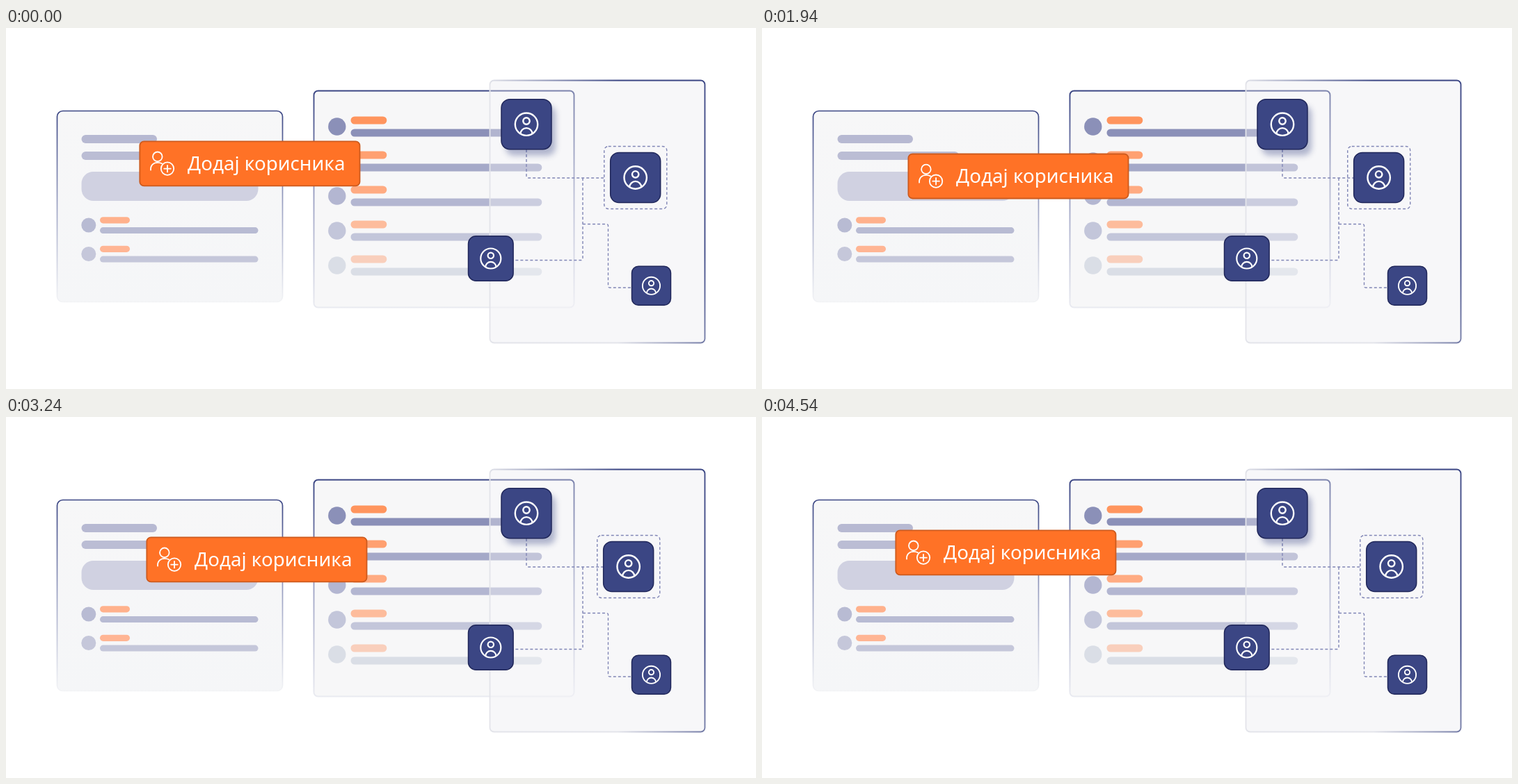
These frames come from a looping animation (1078 by 520 pixels, 4560 ms). An HTML page with a canvas:

```html
<!DOCTYPE html>
<html lang="sr">
<head>
<meta charset="utf-8">
<title>Додај корисника</title>
<style>
  html, body { margin: 0; width: 100%; height: 100%; overflow: hidden; background: #fff; }
  canvas { display: block; width: 1078px; height: 520px; }
</style>
</head>
<body>
<canvas id="stage"></canvas>
<script>
const W = 1078, H = 520;
const HALF = 1140, REST = 800, TICK = 20, STEPS = 17, SHIFT = 18.2;
const NAVY = '#3b4684', PAPER = '#f7f7f8';
const canvas = document.getElementById('stage');
const ctx = canvas.getContext('2d');
const dpr = window.devicePixelRatio || 1;
canvas.width = W * dpr;
canvas.height = H * dpr;

function box(x, y, w, h, r, fill, stroke, line = 1.6) {
  ctx.beginPath();
  ctx.roundRect(x, y, w, h, r);
  if (fill) { ctx.fillStyle = fill; ctx.fill(); }
  if (stroke) { ctx.strokeStyle = stroke; ctx.lineWidth = line; ctx.stroke(); }
}

function disc(x, y, r, fill) {
  ctx.beginPath();
  ctx.arc(x, y, r, 0, Math.PI * 2);
  ctx.fillStyle = fill;
  ctx.fill();
}

function ring(x, y, r) {
  ctx.beginPath();
  ctx.arc(x, y, r, 0, Math.PI * 2);
  ctx.stroke();
}

const bar = (x1, x2, y, h, fill) => box(x1, y - h / 2, x2 - x1, h, h / 2, fill);

function gradient(x1, y1, x2, y2, ...colors) {
  const g = ctx.createLinearGradient(x1, y1, x2, y2);
  colors.forEach((c, i) => g.addColorStop(i / (colors.length - 1), c));
  return g;
}

function dashes(points) {
  ctx.beginPath();
  ctx.moveTo(...points[0]);
  for (let i = 1; i < points.length - 1; i++) ctx.arcTo(...points[i], ...points[i + 1], 2);
  ctx.lineTo(...points[points.length - 1]);
  ctx.stroke();
}

function dashStyle() {
  ctx.setLineDash([4, 3]);
  ctx.strokeStyle = '#8186b6';
  ctx.lineWidth = 1.4;
}

function tile(cx, cy, size) {
  const h = size / 2;
  box(cx - h, cy - h, size, size, size * 0.17, NAVY, '#20275a', 1.5);
  const k = size / 72;
  ctx.save();
  ctx.translate(cx, cy);
  ctx.scale(k, k);
  ctx.strokeStyle = '#fff';
  ctx.lineWidth = 2.4;
  ring(0, 0, 16.2);
  ring(0, -4.7, 4.7);
  ctx.beginPath();
  ctx.ellipse(0, 13.6, 8.4, 8.2, 0, Math.PI, Math.PI * 2);
  ctx.stroke();
  ctx.restore();
}

function leftCard() {
  box(73.5, 119.5, 324, 275, 8, gradient(0, 119, 0, 395, '#f7f7f8', '#f5f6f8'),
    gradient(0, 119, 0, 395, NAVY, '#9ea4c4', '#f3f4f6'), 1.7);
  bar(108.5, 217, 160, 12, '#b7b9d2');
  bar(108.5, 283, 184, 12, '#bbbdd4');
  box(108.5, 207, 254, 42, 17, '#d0d1e1');
  [[284, '#b8bbd3', '#ffb18c'], [325.5, '#c5c7da', '#ffb594']].forEach(([y, blue, orange]) => {
    disc(118.8, y, 10.5, blue);
    bar(135, 178, y - 7.2, 9.2, orange);
    bar(135, 362.5, y + 7.6, 9, blue);
  });
}

function rightCards() {
  box(695.5, 75.5, 309, 378, 6, PAPER);
  box(442.5, 90.5, 374, 312, 6, PAPER, gradient(0, 90, 0, 403, NAVY, '#a0a5c6', '#eaebf1'), 1.9);
  const rows = [
    ['#8b90b8', '#ff955e'], ['#a5a9c8', '#ffa071'], ['#b3b6d1', '#ffab82'],
    ['#c3c6da', '#fdbc9c'], ['#dadee6', '#f9cfbc']
  ];
  rows.forEach(([blue, orange], i) => {
    const y = 142 + i * 50;
    disc(475.8, y, 12.7, blue);
    bar(495.5, 547.3, y - 9, 11, orange);
    bar(495.5, 770.3, y + 9, 11, blue);
  });
  ctx.globalAlpha = 0.35;
  box(695.5, 75.5, 309, 378, 6, PAPER);
  ctx.globalAlpha = 1;
  box(695.5, 75.5, 309, 378, 6, null, gradient(690, 75, 842, -1, '#e3e4ea', NAVY), 1.8);
}

function links() {
  ctx.save();
  dashStyle();
  dashes([[748, 175], [748, 216], [860, 216]]);
  dashes([[829, 216], [829, 334.5], [729, 334.5]]);
  dashes([[829, 282.5], [865.5, 282.5], [865.5, 374], [899, 374]]);
  ctx.restore();
}

function fixedTiles() {
  ctx.save();
  ctx.shadowColor = 'rgba(59,70,132,.38)';
  ctx.shadowBlur = 9 * dpr;
  ctx.shadowOffsetX = 6 * dpr;
  ctx.shadowOffsetY = 9 * dpr;
  box(712, 102.7, 72, 72, 12, NAVY);
  ctx.restore();
  tile(748, 138.7, 72);
  tile(696.8, 332, 64.6);
  tile(927.5, 371.3, 56);
}

function movingTile(dx) {
  ctx.save();
  ctx.translate(dx, 0);
  ctx.save();
  dashStyle();
  ctx.beginPath();
  ctx.roundRect(859.8, 170.5, 90, 90, 6);
  ctx.stroke();
  ctx.restore();
  tile(904.7, 215.5, 72);
  ctx.restore();
}

function button(d) {
  ctx.save();
  ctx.translate(d, d);
  box(192.3, 163.4, 316.2, 64, 6, '#ff7226', '#cd5a1d', 1.8);
  ctx.strokeStyle = '#fff';
  ctx.lineWidth = 1.8;
  ctx.lineCap = 'round';
  ring(217.8, 185.3, 6.8);
  ring(232, 202.6, 9.2);
  ctx.beginPath();
  ctx.moveTo(208, 204.5);
  ctx.bezierCurveTo(207.5, 197.5, 212, 193.8, 218, 193.8);
  ctx.quadraticCurveTo(221.5, 193.8, 224, 195.3);
  ctx.moveTo(227.2, 202.6);
  ctx.lineTo(236.8, 202.6);
  ctx.moveTo(232, 197.8);
  ctx.lineTo(232, 207.4);
  ctx.stroke();
  ctx.fillStyle = '#fff';
  ctx.font = '27.7px "Noto Sans", "Open Sans", sans-serif';
  ctx.fillText('Додај корисника', 261, 205.3);
  ctx.restore();
}

// Smooth in-out curve, bezier (.42, 0, .58, 1)
function ease(x) {
  if (x <= 0 || x >= 1) return Math.min(1, Math.max(0, x));
  let lo = 0, hi = 1, s = 0.5;
  for (let i = 0; i < 24; i++) {
    s = (lo + hi) / 2;
    const bx = 1.26 * s * (1 - s) ** 2 + 1.74 * s * s * (1 - s) + s ** 3;
    if (bx < x) lo = s; else hi = s;
  }
  return s * s * (3 - 2 * s);
}

function progress(ms) {
  const t = ms % (HALF * 2);
  const step = Math.floor((t % HALF - REST) / TICK) + 1;
  const p = ease(step / STEPS);
  return t < HALF ? p : 1 - p;
}

let start = null;
function frame(now) {
  if (start === null) start = now;
  const d = SHIFT * progress(now - start);
  ctx.setTransform(dpr, 0, 0, dpr, 0, 0);
  ctx.fillStyle = '#fff';
  ctx.fillRect(0, 0, W, H);
  leftCard();
  rightCards();
  links();
  fixedTiles();
  movingTile(-d);
  button(d);
  requestAnimationFrame(frame);
}
requestAnimationFrame(frame);
</script>
</body>
</html>
```
